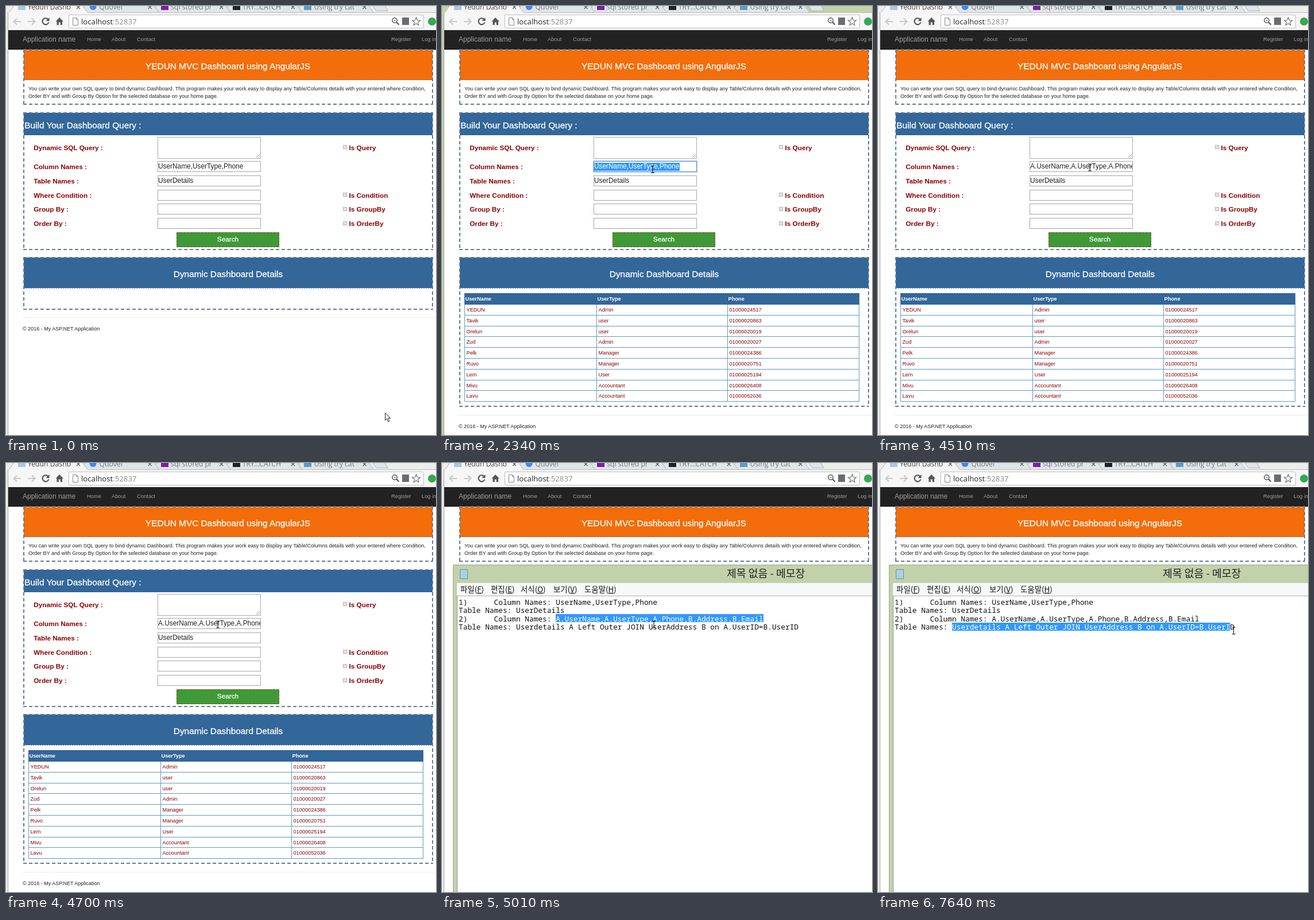
These frames come from a looping animation (749x747 px, 8 s). An HTML page:

```html
<!DOCTYPE html>
<html lang="en">
<head>
<meta charset="utf-8">
<title>Dashboard query</title>
<style>
html, body { margin: 0; width: 100%; height: 100%; overflow: hidden; background: #fff; }
svg { display: block; }
text { font-family: "Liberation Sans", Arial, sans-serif; white-space: pre; }
.ui { font-family: "Open Sans", "Noto Sans", sans-serif; }
.ko { font-family: "Noto Sans CJK KR", "Noto Sans CJK", sans-serif; font-weight: 300; }
.mono { font-family: "Noto Sans Mono", "DejaVu Sans Mono", monospace; font-weight: 300; }
.b { font-weight: bold; }
.head { stroke: #fff; stroke-width: .3px; }
rect { shape-rendering: crispEdges; }
</style>
</head>
<body>
<script>
const NS = 'http://www.w3.org/2000/svg';
const BLUE = '#336699', RED = '#8b0000', PICK = '#3399ff', GREEN = '#c3d1ab', DASH = '#667a98';

function el(parent, tag, attrs = {}, content) {
  const e = document.createElementNS(NS, tag);
  for (const k in attrs) e.setAttribute(k, attrs[k]);
  if (content !== undefined) e.textContent = content;
  parent.appendChild(e);
  return e;
}
const group = p => el(p, 'g');
const box = (p, x, y, width, height, fill, more) => el(p, 'rect', { x, y, width, height, fill, ...more });
const frame = (p, x, y, w, h, stroke, fill = '#fff', more) => box(p, x + .5, y + .5, w - 1, h - 1, fill, { stroke, ...more });
const text = (p, x, y, size, fill, str, more) => el(p, 'text', { x, y, 'font-size': size, fill, ...more }, str);
const line = (p, d, stroke, width = 1, more) => el(p, 'path', { d, stroke, 'stroke-width': width, fill: 'none', ...more });
const dotted = (p, y) => line(p, `M31 ${y}H743`, DASH, 1, { 'stroke-dasharray': '2 2' });
// Each side starts its dashes at its own top or left corner
const dashed = (p, x, y, w, h) => line(p,
  `M${x} ${y + 1}h${w}M${x} ${y + h - 1}h${w}M${x + 1} ${y}v${h}M${x + w - 1} ${y}v${h}`,
  DASH, 2, { 'stroke-dasharray': '6 4' });
const HEAD = { class: 'head' }, MID = { 'text-anchor': 'middle', class: 'head' };
const BOLD = { class: 'b' }, UI = { class: 'ui' };
const show = (e, on) => e.setAttribute('visibility', on ? 'visible' : 'hidden');

const root = el(document.body, 'svg', { width: 749, height: 747, viewBox: '0 0 749 747' });

// Browser window
const chrome = box(root, 0, 0, 749, 747, GREEN);
const tabs = [['Yedun Dashb', '#a9c6e2'], ['Quovel', '#4285f4'], ['sql stored pr', '#7b1fa2'],
  ['TRY...CATCH', '#222'], ['Using try cat', '#5f9cc4']];
function tab(i) {
  const [title, color] = tabs[i], x = 12 + i * 124.6;
  const d = `M${x - 7} 11.5L${x + 2} -1H${x + 121}L${x + 130} 11.5`;
  el(root, 'path', { d, fill: i ? '#dfe6ea' : '#f6f6f6', stroke: '#b0b5b2' });
  if (i === 1) el(root, 'circle', { cx: x + 15, cy: 1, r: 6, fill: color });
  else box(root, Math.round(x + 9), 0, 13, 7, color);
  text(root, x + 26, 6, 12.2, i ? '#777' : '#444', title, UI);
  const c = x + 114;
  line(root, `M${c - 3} -1L${c + 3} 5M${c + 3} -1L${c - 3} 5`, '#666', 1.4);
}
el(root, 'path', { d: 'M639 -1L643 6Q644 8.500 647 8.500H665L660 -1Z', fill: '#dfe6ea', stroke: '#b0b5b2' });
for (let i = 4; i >= 0; i--) tab(i);

box(root, 4, 11, 745, 31, '#f6f6f6');
line(root, 'M142 11.500H749', '#b9bdb9');
box(root, 4, 42, 745, 705, '#fff');
line(root, 'M3.500 11V747', '#a3a6a2');
el(root, 'rect', { x: 109.5, y: 15.5, width: 618, height: 23, rx: 2, fill: '#fff', stroke: '#bdbdbd' });
line(root, 'M26 27H14M19 21.500L13.500 27L19 32.500M38 27H50M45 21.500L50.500 27L45 32.500', '#cacaca', 2.2);
line(root, 'M73.500 23.500A5.500 5.500 0 1 0 74.300 28.500', '#555', 2.2);
el(root, 'path', { d: 'M75.500 20V26H69.500Z', fill: '#555' });
el(root, 'path', { d: 'M93 20L86.500 27H88.500V33H91.800V28.500H94.700V33H98V27H100Z', fill: '#555' });
line(root, 'M116.500 20.500H122.500L125.500 23.500V33.500H116.500ZM122.500 20.500V23.500H125.500', '#888');
const url = text(root, 131, 32, 13.2, '#222', '', UI);
el(url, 'tspan', {}, 'localhost');
el(url, 'tspan', { fill: '#888' }, ':52837');
el(root, 'circle', { cx: 677, cy: 25, r: 4.2, fill: 'none', stroke: '#555', 'stroke-width': 1.5 });
line(root, 'M680 28L684.500 32.500', '#555', 2.2);
line(root, 'M675 25H679', '#555');
box(root, 690, 20, 12, 13, '#6a6d70');
let star = '';
for (let i = 0; i < 10; i++) {
  const a = -Math.PI / 2 + i * Math.PI / 5, r = i % 2 ? 3.2 : 7.5;
  star += `${i ? 'L' : 'M'}${714.5 + r * Math.cos(a)} ${27.3 + r * Math.sin(a)}`;
}
line(root, star + 'Z', '#666', 1.1);
el(root, 'circle', { cx: 742, cy: 27, r: 7, fill: '#35a853' });

// Page header
box(root, 4, 42, 745, 34, '#222');
box(root, 4, 75, 745, 1, '#080808');
text(root, 29, 62, 12, '#9d9d9d', 'Application name');
[[141, 'Home'], [184, 'About'], [228, 'Contact'], [671, 'Register'], [724, 'Log in']]
  .forEach(([x, s]) => text(root, x, 61, 9.3, '#9d9d9d', s));

box(root, 31, 77, 712, 52, '#f36d0a');
dotted(root, 128.5);
dashed(root, 30, 75, 714, 97);
text(root, 386.5, 110, 15.37, '#fff', 'YEDUN MVC Dashboard using AngularJS', MID);
text(root, 39, 146.5, 9.04, '#222', 'You can write your own SQL query to bind dynamic Dashboard. This program makes your work easy to display any Table/Columns details with your entered where Condition,');
text(root, 39, 159.5, 9.04, '#222', 'Order BY and with Group By Option for the selected database on your home page.');

// Query form
box(root, 31, 186, 712, 39, BLUE);
dashed(root, 30, 185, 714, 240);
text(root, 32.3, 213, 15.37, '#fff', 'Build Your Dashboard Query :', HEAD);
const fields = [
  ['Dynamic SQL Query :', 246.5, 'Is Query'], ['Column Names :', 280], ['Table Names :', 304.5],
  ['Where Condition :', 329.5, 'Is Condition'], ['Group By :', 354, 'Is GroupBy'], ['Order By :', 379, 'Is OrderBy']];
fields.forEach(([label, y, check], i) => {
  text(root, 48.2, y + 4, 11.75, RED, label, BOLD);
  if (i) frame(root, 264, Math.floor(y - 9.5), 180, 19, '#a6a6a6');
  else frame(root, 264, 228, 180, 38, '#a9a9a9');
  if (!check) return;
  frame(root, 587, Math.floor(y) - 4, 7, 7, '#b4b4b4', '#e4e4e4');
  text(root, 597.5, y + 4, 11.75, RED, check, BOLD);
});
line(root, 'M436 264L442 258M439.500 264L442 261.500', '#888');
const focus = group(root);
frame(focus, 263, 269, 182, 21, '#b9d3ee', 'none');
frame(focus, 264, 270, 180, 19, '#4a8fd4');
const pick = box(root, 265, 273, 149, 13.5, PICK);
const clip = el(root, 'svg', { x: 265, y: 271, width: 178, height: 17, overflow: 'hidden' });
const columns = text(clip, 0, 12.3, 11.86, '#222', '');
text(root, 265, 307.8, 11.86, '#222', 'UserDetails');
box(root, 297, 394, 179, 26, '#3f9936');
frame(root, 297, 394, 179, 26, '#a23a25', 'none', { 'stroke-dasharray': '3 3' });
text(root, 386.5, 410, 11.8, '#fff', 'Search', MID);

// Results
box(root, 31, 438, 712, 53, BLUE);
dotted(root, 491.5);
text(root, 387, 472, 15.37, '#fff', 'Dynamic Dashboard Details', MID);
const shortPanel = group(root), results = group(root), foot = group(root);
dashed(shortPanel, 30, 437, 714, 92);
dashed(results, 30, 437, 714, 261);
const rows = [
  ['YEDUN', 'Admin', '24517'], ['Tavik', 'user', '20863'], ['Orelun', 'user', '20019'],
  ['Zud', 'Admin', '20027'], ['Pelk', 'Manager', '24386'], ['Ruvo', 'Manager', '20751'],
  ['Lem', 'User', '25194'], ['Mivu', 'Accountant', '26408'], ['Lavu', 'Accountant', '52036']];
const cols = [39, 269, 497, 726], ROW = 18.8, EDGE = '#5e9bc4';
cols.forEach(x => box(results, x, 500, 1, 189, EDGE));
box(results, 39, 500, 688, 20, BLUE);
['UserName', 'UserType', 'Phone'].forEach((s, i) => text(results, cols[i] + 1.5, 512.5, 9.2, '#fff', s, BOLD));
rows.forEach(([name, type, tail], r) => {
  const y = 532 + r * ROW;
  [name, type, '010000' + tail].forEach((s, i) => text(results, cols[i] + 3.5, y, 9.2, RED, s));
  box(results, 39, Math.round(519 + (r + 1) * ROW), 688, 1, EDGE);
});
box(foot, 29, 542, 720, 1, '#eaeaea');
text(foot, 29, 564.5, 9, '#222', '© 2016 - My ASP.NET Application');

// Notepad window
const pad = group(root);
box(pad, 19, 177, 740, 590, GREEN);
line(pad, 'M749 177.500H19.500V747', '#98a584');
frame(pad, 31, 185, 14, 17, '#6d8f9c', '#a5d3e2');
text(pad, 496, 199, 18.3, '#222', '제목 없음 - 메모장', { class: 'ko' });
box(pad, 26, 209, 723, 23, '#f7f8f9');
[[32, '파일', 'F'], [85, '편집', 'E'], [137, '서식', 'O'], [194, '보기', 'V'], [248, '도움말', 'H']].forEach(([x, s, key]) => {
  const item = text(pad, x, 225, 13.4, '#111', s + '(', { class: 'ko' });
  el(item, 'tspan', { 'text-decoration': 'underline' }, key);
  el(item, 'tspan', {}, ')');
});
box(pad, 26, 231, 723, 516, '#fff');
box(pad, 26, 231, 723, 1, '#a9b0b4');
box(pad, 26, 231, 1, 516, '#7d9fae');

const CHAR = 7.69, QUERY = 'A.UserName,A.UserType,A.Phone,B.Address,B.Email';
const JOIN = 'Userdetails A Left Outer JOIN UserAddress B on A.UserID=B.UserID';
const mono = (x, row, str) => text(pad, x, 246.7 + row * 14.45, 12.82, '#111', str, { class: 'mono' });
// A line of text whose first n characters can be highlighted
function selectable(x, row, str) {
  const mark = box(pad, x, 263 + (row - 2) * 14.6, 0, 14.4, PICK);
  const t = mono(x, row, '');
  const lit = el(t, 'tspan', { fill: '#fff' }), rest = el(t, 'tspan');
  return n => {
    mark.setAttribute('width', n * CHAR);
    lit.textContent = str.slice(0, n);
    rest.textContent = str.slice(n);
  };
}
mono(29, 0, '1)');
mono(90.5, 0, 'Column Names: UserName,UserType,Phone');
mono(29, 1, 'Table Names: UserDetails');
mono(29, 2, '2)');
mono(90.5, 2, 'Column Names: ');
mono(29, 3, 'Table Names: ');
const pickQuery = selectable(198.2, 2, QUERY), pickJoin = selectable(129, 3, JOIN);

// Pointers
const arrow = el(root, 'path', { d: 'M.5 .5V13.300L3.500 10.500L5.700 15.800L7.800 14.900L5.600 9.700H9.700Z', fill: '#fff', stroke: '#222' });
const beam = line(root, 'M-3 -6H-1L0 -5L1 -6H3M0 -5V5M-3 6H-1L0 5L1 6H3', '#111', 1.1);

// start, last step, number of steps, x, y
const moves = [
  [70, 480, 6, 386, 403], [1010, 1240, 4, 372, 281], [1390, 1860, 7, 367, 284.5],
  [2880, 2960, 2, 369, 281], [5240, 5550, 5, 268, 311], [5620, 6010, 6, 157, 292],
  [6090, 6340, 4, 141, 289.5], [6420, 6500, 2, 131, 290], [6560, 6870, 5, 255, 290],
  [6950, 7640, 10, 619.5, 292]];
const ease = p => .5 - .5 * Math.cos(Math.PI * p);
function pointer(t) {
  let x = 660, y = 708;
  for (const [t0, t1, n, tx, ty] of moves) {
    if (t < t0) break;
    const step = Math.min(n, Math.floor((t - t0) / (t1 - t0) * (n - 1) + 1e-6) + 1);
    const p = ease(step / n);
    x += (tx - x) * p;
    y += (ty - y) * p;
  }
  return [x, y];
}

function draw(t) {
  const [x, y] = pointer(t), loaded = t >= 1010, pasted = t >= 3100;
  chrome.setAttribute('fill', t >= 780 && t < 3650 ? GREEN : '#eceeec');
  show(results, loaded);
  show(shortPanel, !loaded);
  foot.setAttribute('transform', `translate(0 ${loaded ? 170 : 0})`);

  const focused = t >= 1390 && t < 3650, selected = t >= 2340 && !pasted;
  show(focus, focused);
  show(pick, selected);
  const atEnd = pasted && focused;
  columns.textContent = pasted ? QUERY : 'UserName,UserType,Phone';
  columns.setAttribute('fill', selected ? '#fff' : '#222');
  columns.setAttribute('x', atEnd ? 177 : 0);
  columns.setAttribute('text-anchor', atEnd ? 'end' : 'start');

  show(pad, t >= 4840);
  const stage = t < 4920 ? 0 : t < 5010 ? 1 : 2;
  pad.setAttribute('opacity', [.35, .8, 1][stage]);
  const s = [.95, .985, 1][stage];
  pad.setAttribute('transform', `translate(${449 * (1 - s)} ${560 * (1 - s)}) scale(${s})`);
  const drag = t >= 6500;
  pickQuery(drag ? 0 : QUERY.length);
  pickJoin(drag ? Math.max(0, Math.floor((x - 129) / CHAR)) : 0);

  const typing = t >= 1240;
  show(arrow, !typing);
  show(beam, typing);
  (typing ? beam : arrow).setAttribute('transform', `translate(${x} ${y})`);
}

const begin = performance.now();
function tick() {
  draw((performance.now() - begin) % 8000);
  requestAnimationFrame(tick);
}
tick();
</script>
</body>
</html>
```
